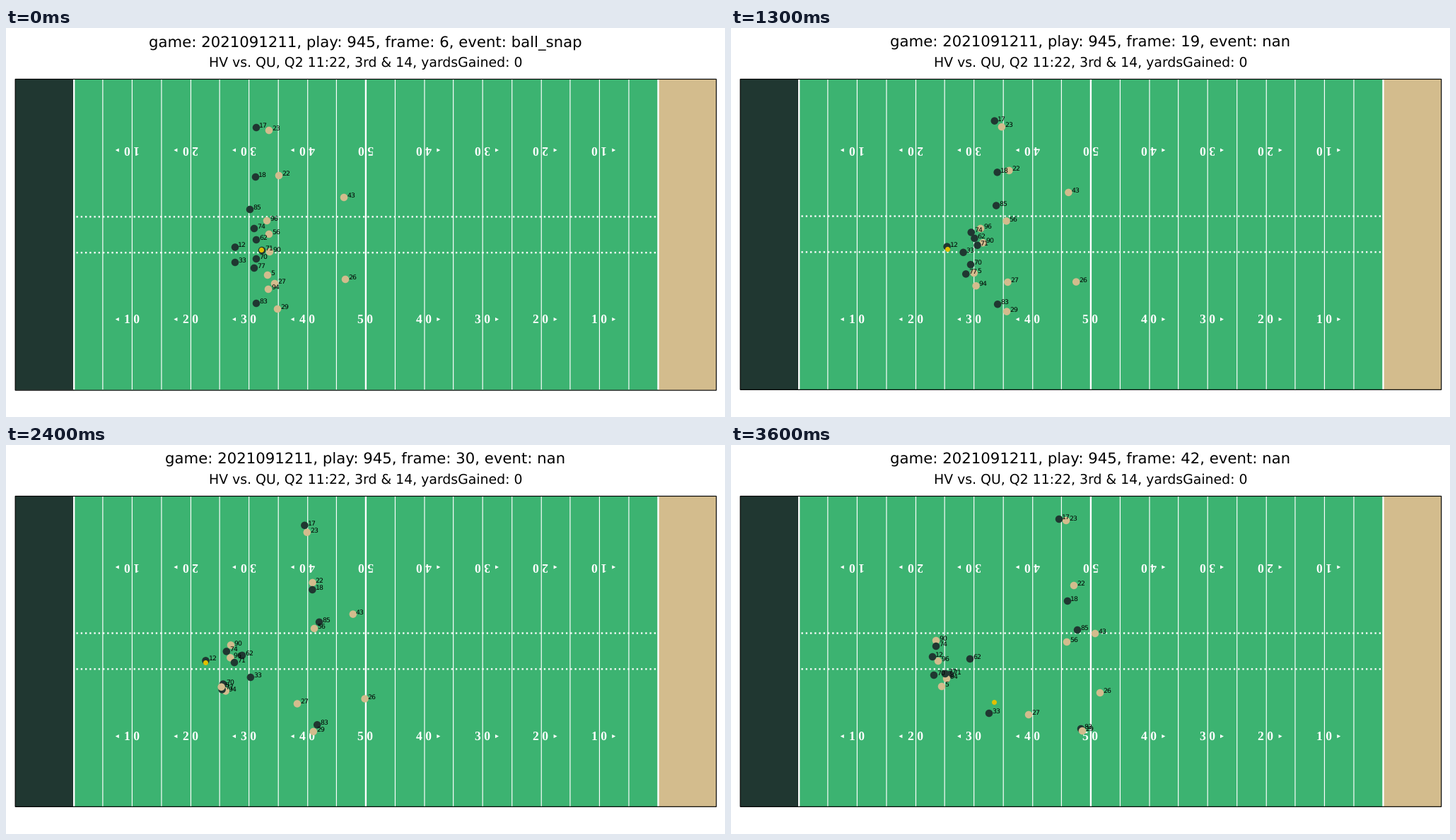
A matplotlib script that plays this animation: 1017x551 px, repeating every 3700 ms.

```python
import numpy as np
import matplotlib.pyplot as plt
from matplotlib.animation import FuncAnimation
from matplotlib.patches import Polygon, Rectangle

WIDTH, HEIGHT, DPI = 1017, 551, 84.75
FRAMES, INTERVAL = 37, 100

# The field is laid out on a 1200-unit-wide grid that is scaled to the stage.
SCALE = WIDTH / 1200
MARGIN, YARD, FIELD_YARDS = 15, 9.75, 53.3
TOP, EVENT_TOP = 84.55, 85.0
HASHES = (23.58, 29.72)

DARK, TAN, GRASS, BALL = "#203731", "#d3bc8d", "#3cb371", "#e0c000"
EVENTS = {0: "ball_snap", 31: "pass_forward"}
SUBTITLE = "HV vs. QU, Q2 11:22, 3rd & 14, yardsGained: 0"

plt.rcParams["font.family"] = "DejaVu Sans"
plt.rcParams["text.hinting"] = "none"
fig = plt.figure(figsize=(WIDTH / DPI, HEIGHT / DPI), dpi=DPI, facecolor="white")
ax = fig.add_axes([0, 0, 1, 1])
ax.set_xlim(0, WIDTH)
ax.set_ylim(HEIGHT, 0)
ax.axis("off")


def crisp(units):
    """Stage position of a line centred on a grid cell."""
    return (np.floor(units + 0.5) + 0.5) * SCALE


def yard_x(yard):
    return MARGIN + yard * YARD


# --- field ---
field_top = crisp(TOP)
field_bottom = crisp(TOP + FIELD_YARDS * YARD)


def block(start, end, color):
    left, right = crisp(yard_x(start)), crisp(yard_x(end))
    ax.add_patch(Rectangle((left, field_top), right - left,
                           field_bottom - field_top + 0.5, facecolor=color,
                           linewidth=0, snap=False, zorder=1))


def yard_label(yard, number, arrow):
    """Spaced number at both sidelines, with an arrow (-1, 0, 1) to the nearer goal."""
    x = yard_x(yard) * SCALE
    for baseline, middle, angle in ((419, 412.6, 0), (166.4, 173, 180)):
        ax.text(x, baseline, " ".join(str(number)), rotation=angle,
                rotation_mode="anchor", ha="center", va="baseline",
                family="Liberation Serif", weight="bold", size=15,
                color="white", zorder=3)
        if arrow:
            base, tip = x + 18.2 * arrow, x + 23.2 * arrow
            ax.add_patch(Polygon([(base, middle - 2.6), (base, middle + 2.6),
                                  (tip, middle)], facecolor="white",
                                 linewidth=0, zorder=3))


block(0, 10, DARK)
block(10, 110, GRASS)
block(110, 120, TAN)
for yard in range(10, 111, 5):
    ax.plot([crisp(yard_x(yard))] * 2, [field_top, field_bottom], color="white",
            lw=2 if yard in (10, 60, 110) else 1, solid_capstyle="butt",
            snap=False, zorder=2)
for yard in range(20, 101, 10):
    yard_label(yard, 50 - abs(yard - 60), int(np.sign(yard - 60)))

hash_span = [yard_x(10.5) * SCALE, yard_x(110) * SCALE]
hash_lines = [ax.plot(hash_span, [0, 0], ":", color="white", lw=2, snap=False,
                      zorder=2)[0] for _ in HASHES]
border = Rectangle((0, 0), 1, 1, fill=False, edgecolor="black", linewidth=1,
                   snap=False, zorder=4)
ax.add_patch(border)


def place_field(top):
    left, right = crisp(yard_x(0)), crisp(yard_x(120))
    upper, lower = crisp(top), crisp(top + FIELD_YARDS * YARD)
    border.set_bounds(left, upper, right - left, lower - upper)
    for line, yards in zip(hash_lines, HASHES):
        line.set_ydata([crisp(top + yards * YARD)] * 2)


# --- motion ---
MIDWAY = 20


def progress(frame):
    """Shared pace: a slow start off the snap, then easing out."""
    u = (frame / (FRAMES - 1)) ** 1.25
    return u * u * (3 - 2 * u)


class Player:
    def __init__(self, number, color, start, midway, end):
        self.color = color
        self.start, self.end = np.array(start), np.array(end)
        p = progress(MIDWAY)
        straight = self.start + (self.end - self.start) * p
        self.bend = (np.array(midway) - straight) / (p * (1 - p))
        self.label = ax.text(0, 0, str(number), size=8, color="black", zorder=7)

    def at(self, frame):
        p = progress(frame)
        return self.start + (self.end - self.start) * p + self.bend * p * (1 - p)


# Drawing order, each with a start, a midway and an end position.
quarterback = Player(12, DARK, (324, 310.5), (288, 307.5), (285, 300))
players = [
    Player(33, DARK, (324, 332), (338, 317), (365, 380)),
    Player(23, TAN, (372, 145), (406, 131), (474, 107)),
    Player(43, TAN, (478, 240), (483, 233), (515, 267)),
    Player(90, TAN, (373, 317), (333, 290), (290, 277)),
    Player(85, DARK, (345, 257), (417, 249), (490, 262)),
    Player(62, DARK, (354, 300), (336, 297), (338, 303)),
    Player(83, DARK, (354, 390), (414, 394), (495, 402)),
    Player(74, DARK, (351, 284), (323, 293), (290, 285)),
    Player(22, TAN, (386, 209), (414, 196), (485, 199)),
    Player(96, TAN, (369, 273), (331, 296), (293, 306)),
    Player(71, DARK, (362, 315), (332, 305), (310, 325)),
    Player(70, DARK, (354, 327), (319, 340), (287, 326)),
    Player(29, TAN, (384, 398), (412, 405), (497, 405)),
    quarterback,
    Player(27, TAN, (380, 362), (405, 362), (421, 382)),
    Player(18, DARK, (353, 211), (411, 202), (476, 221)),
    Player(94, TAN, (371, 370), (321, 356), (305, 331)),
    Player(56, TAN, (372, 292), (417, 260), (475, 279)),
    Player(17, DARK, (354, 141), (402, 120), (464, 105)),
    Player(77, DARK, (351, 340), (313, 351), (303, 324)),
    Player(5, TAN, (370, 350), (316, 344), (298, 342)),
    Player(26, TAN, (480, 356), (500, 361), (522, 351)),
]

SNAP, CATCH, THROW = 3.5, 10.5, 30.2
SPOT, TARGET = np.array([361, 313.5]), np.array([372.4, 364.4])


def ball_at(frame):
    """Snapped to the quarterback, carried, then thrown in a straight line."""
    hand = quarterback.at(min(frame, THROW)) + (0, 3)
    snapped = np.clip((frame - SNAP) / (CATCH - SNAP), 0, 1)
    thrown = np.clip((frame - THROW) / (FRAMES - 1 - THROW), 0, 1)
    held = SPOT + (hand - SPOT) * snapped
    return held + (TARGET - held) * thrown


dots = ax.scatter([0] * len(players), [0] * len(players), s=80,
                  c=[p.color for p in players], linewidths=0, zorder=5)
ball = ax.scatter([0], [0], s=36, c=BALL, linewidths=0, zorder=6)
title = fig.text(0.5, 1 - 27 / HEIGHT, "", size=18, ha="center", va="baseline")
fig.text(0.5, 1 - 55 / HEIGHT, SUBTITLE, size=16, ha="center", va="baseline")


def draw(frame):
    event = EVENTS.get(frame, "nan")
    title.set_text(f"game: 2021091211, play: 945, frame: {frame + 6}, event: {event}")
    place_field(EVENT_TOP if frame in EVENTS else TOP)
    spots = [p.at(frame) for p in players]
    dots.set_offsets(spots)
    ball.set_offsets(ball_at(frame))
    for player, (x, y) in zip(players, spots):
        player.label.set_position((x + YARD * SCALE / 2, y))
    return [title, border, dots, ball]


animation = FuncAnimation(fig, draw, frames=FRAMES, interval=INTERVAL,
                          repeat=True, repeat_delay=0, blit=False)
plt.show()
```
